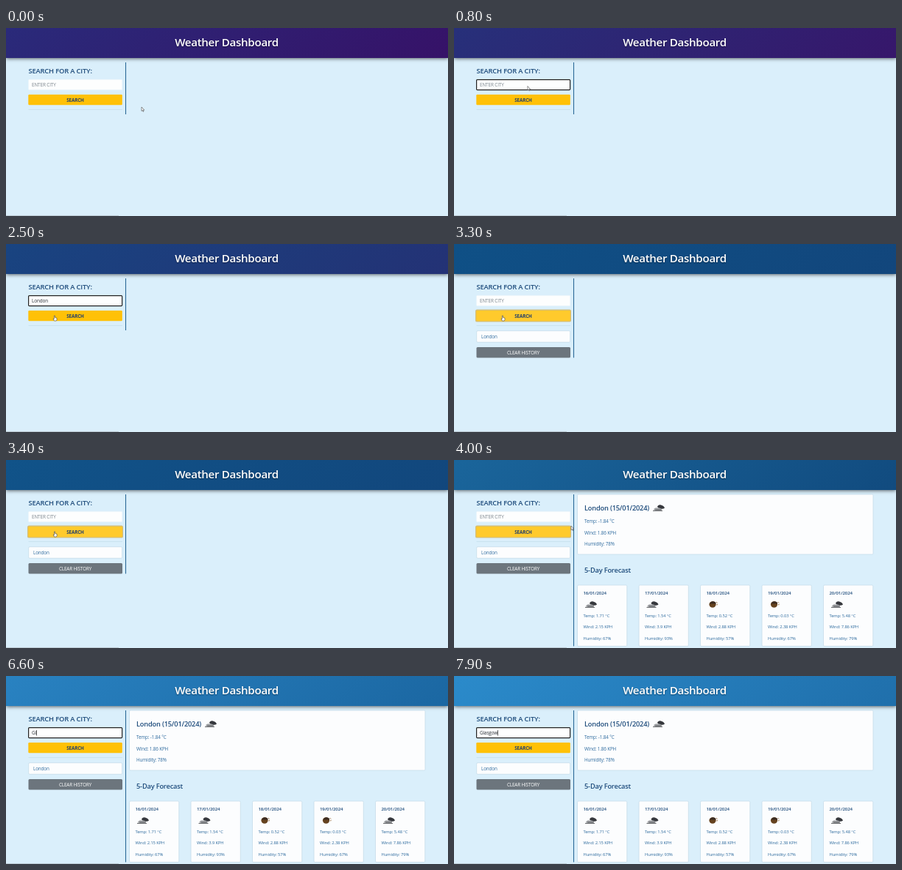
An HTML page that plays this animation: 600x257 px, repeating every 8 s.

```html
<!DOCTYPE html>
<html lang="en">
<head>
<meta charset="utf-8">
<title>Weather Dashboard</title>
<style>
  html, body { margin: 0; width: 100%; height: 100%; overflow: hidden; background: #daeffb; }
  #header { position: absolute; left: 0; top: 0; width: 600px; height: 41px; box-shadow: 0 1px 5px rgba(0, 0, 0, .6); }
  svg { position: absolute; left: 0; top: 0; display: block; }
  text { font-family: "Open Sans", "Noto Sans", sans-serif; font-size: 6.3px; letter-spacing: -.02em; fill: #2d6a9e; }
  .title { font-size: 15.1px; font-weight: 600; fill: #fff; text-shadow: 0 1px 2px rgba(0, 0, 0, .4); }
  .heading { font-size: 9.25px; font-weight: 600; fill: #1d4b7b; }
  .date { font-size: 6.1px; font-weight: 600; fill: #1d4b7b; }
  .small { font-size: 5.8px; }
  .mid { text-anchor: middle; }
  .card { fill: #fcfdfe; stroke: #c6dcea; stroke-width: .8; }
</style>
</head>
<body>
<div id="header"></div>
<svg width="600" height="257" viewBox="0 0 600 257">
  <defs>
    <g id="rain">
      <path d="M-2-2Q0-5 3-4Q7-3 8 0Q6 2 2 1Q-1 1-2-2Z" fill="#36383d"/>
      <path d="M-7 2Q-5-1-2 0Q2-1 4 3Q0 4-7 3Z" fill="#a4a6a9"/>
      <path d="M-8 4H5M-5 2.4H4" stroke="#55575b" stroke-width=".9"/>
    </g>
    <g id="sun">
      <ellipse cx="-2" cy="0" rx="4.6" ry="4.2" fill="#65421f"/>
      <path d="M-6-1Q-4-5 0-4Q3-3 2.5-1Z" fill="#3b2b20"/>
      <path d="M3-3.5L4.5-2M3.5 .5L5 0" stroke="#9a6a3a"/>
    </g>
  </defs>

  <text class="title mid" x="299.5" y="25">Weather Dashboard</text>
  <text class="heading" x="30.5" y="62.3" style="font-size:9.4px">SEARCH FOR A CITY:</text>
  <path id="divider" stroke="#2c6a97" stroke-width="1.1"/>
  <path d="M30.5 111.5H158" stroke="#c6dfed" stroke-width=".8"/>
  <path d="M0 256.5H153" stroke="#bccbd4"/>

  <rect id="input" x="30.6" y="70.6" width="127" height="14" rx="1"/>
  <text id="entry" x="35" y="80.2"></text>
  <rect id="caret" y="74" width=".7" height="7.5" fill="#222"/>

  <rect id="glow" x="29" y="89.6" width="130" height="17" rx="2.2" fill="#d6bd73"/>
  <rect id="button" x="30.3" y="91" width="127.5" height="14.3" rx="1.2"/>
  <text class="mid" x="94" y="100.9" style="font-weight:700;fill:#26426a">SEARCH</text>

  <g id="history">
    <rect class="card" x="30.7" y="118.7" width="127" height="15.6" rx="1.5"/>
    <text x="37" y="128.9">London</text>
    <rect x="30.5" y="141" width="127.5" height="14.6" rx="1.5" fill="#6c757d"/>
    <text class="mid" x="94" y="150.6" style="fill:#fff">CLEAR HISTORY</text>
  </g>

  <g id="weather">
    <rect class="card" x="167.5" y="47" width="401.5" height="82" rx="1.5"/>
    <text class="heading" x="177" y="68.6">London (15/01/2024)</text>
    <use href="#rain" x="278" y="65.5"/>
    <text x="177" y="86.4">Temp: -1.84 °C</text>
    <text x="177" y="102">Wind: 1.86 KPH</text>
    <text x="177" y="117.3">Humidity: 78%</text>
    <text class="heading" x="177" y="154.2">5-Day Forecast</text>
  </g>

  <g id="pointer" stroke="#444" stroke-width=".6" fill="#fff">
    <path id="arrow" d="M0 0V5.5L1.3 4.4L2.2 6.4L3 6L2.2 4.1H3.8Z"/>
    <path id="hand" d="M-.7 0H.5V2.5L3 3.2V5.5L2.2 7H-.6L-2 4.2L-.7 4.5Z"/>
  </g>
</svg>
<script>
const LOOP = 8000;
const $ = id => document.getElementById(id);
const show = (id, on) => { $(id).style.display = on ? '' : 'none'; };

const forecast = [
  ['1.71', '2.15', 67, 'rain'],
  ['1.54', '3.9', 93, 'rain'],
  ['0.52', '2.88', 57, 'sun'],
  ['0.03', '2.38', 67, 'sun'],
  ['5.48', '7.86', 79, 'rain'],
];
$('weather').innerHTML += forecast.map(([temp, wind, humidity, icon], i) => `
  <g transform="translate(${167.5 + 83.5 * i} 171)">
    <rect class="card" width="67.3" height="83.6" rx="1.5"/>
    <text class="date" x="8" y="12.9">${16 + i}/01/2024</text>
    <use href="#${icon}" x="18.5" y="26.5"/>
    <text class="small" x="8" y="43.7">Temp: ${temp} °C</text>
    <text class="small" x="8" y="59.4">Wind: ${wind} KPH</text>
    <text class="small" x="8" y="75.1">Humidity: ${humidity}%</text>
  </g>`).join('');

// Time, then left and right header colours
const sky = [
  [0, 42, 42, 122, 54, 18, 104],
  [1600, 36, 54, 122, 55, 27, 110],
  [3300, 15, 80, 134, 18, 70, 124],
  [4000, 26, 101, 155, 17, 75, 127],
  [5000, 32, 110, 167, 21, 88, 142],
  [6600, 41, 130, 193, 27, 103, 162],
  [8000, 43, 139, 203, 32, 112, 172],
];
// Time, then pointer tip
const track = [
  [0, 184, 108], [100, 184, 108], [500, 112, 80], [1100, 88, 79], [1600, 78.5, 86.5],
  [2200, 66, 98], [3400, 66, 98], [4000, 158.5, 90], [4400, 330, 120],
];

function sample(keys, t) {
  const i = keys.findIndex(k => k[0] > t);
  if (i < 0) return keys[keys.length - 1].slice(1);
  const a = keys[i - 1], b = keys[i];
  const p = (t - a[0]) / (b[0] - a[0]);
  return a.slice(1).map((v, n) => v + (b[n + 1] - v) * p);
}

function typed(t) {
  if (t >= 1400 && t < 2700) return 'London';
  if (t < 6350) return '';
  return 'Glasgow'.slice(0, 1 + Math.floor((t - 6350) / 200));
}

function draw(t) {
  const c = sample(sky, t);
  $('header').style.background =
    `linear-gradient(135deg, rgb(${c.slice(0, 3)}), rgb(${c.slice(3)}))`;

  const searched = t >= 2700, loaded = t >= 3500;
  const typing = t >= 5500;
  const focused = typing || (t >= 500 && !searched);
  const preview = t >= 1400 && t < 2000;
  const value = typed(t);

  $('input').style.cssText = `fill:${preview ? '#e8f0fa' : '#fdfefe'};` +
    `stroke:${focused ? '#222' : '#eef5fa'};stroke-width:${focused ? 1.2 : .6}`;
  const entry = $('entry');
  entry.textContent = value || 'ENTER CITY';
  entry.style.fill = value ? '#2b3036' : '#7b848c';
  entry.style.fontSize = preview ? '5.3px' : '6.4px';
  $('caret').setAttribute('x', 35 + (value ? entry.getComputedTextLength() : 0));
  show('caret', typing && (value || t % 1000 < 500));

  show('glow', searched && !typing);
  $('button').style.fill = searched && !typing ? '#ffca2c' : '#ffc107';
  show('history', searched);
  show('weather', loaded);
  $('divider').setAttribute('d', `M162.5 47V${loaded ? 254.5 : searched ? 155.5 : 118}`);

  const [x, y] = sample(track, t);
  const onButton = t >= 2000 && t < 3950;
  $('pointer').setAttribute('transform', `translate(${x} ${y})`);
  show('pointer', t < 4400);
  show('hand', onButton);
  show('arrow', !onButton);
}

function tick() {
  draw(performance.now() % LOOP);
  requestAnimationFrame(tick);
}
tick();
</script>
</body>
</html>
```
